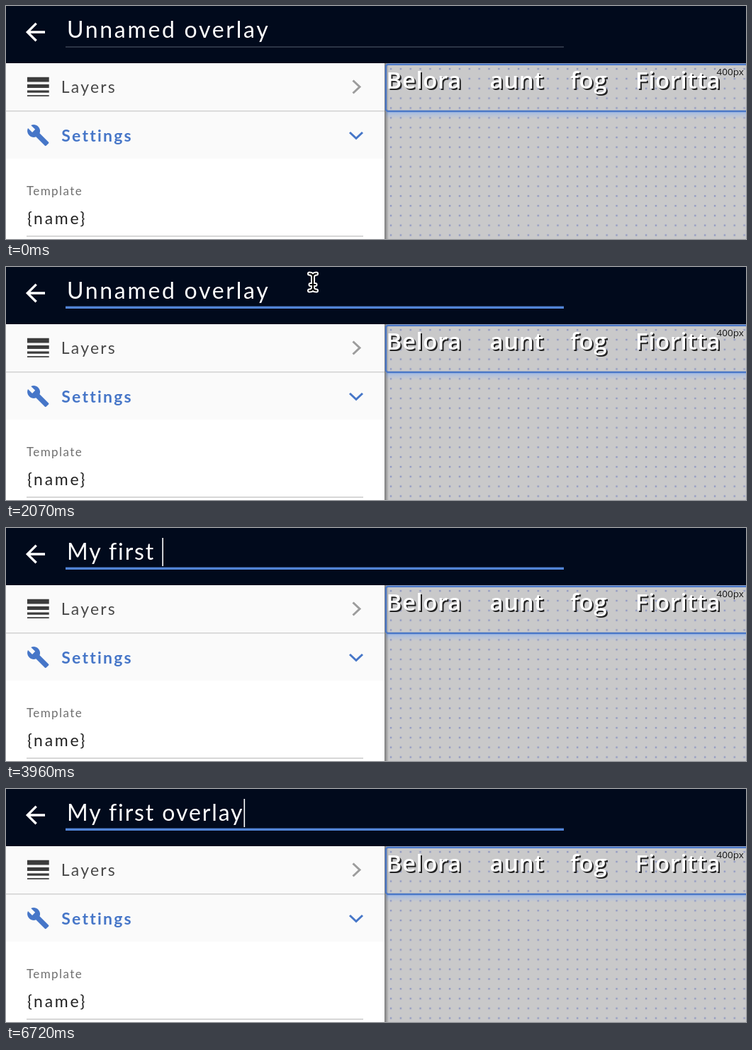
An HTML page that plays this animation: 1044x330 px, repeating every 6.75 s.

```html
<!DOCTYPE html>
<html lang="en">
<head>
<meta charset="utf-8">
<title>Rename an overlay</title>
<style>
  html, body { margin: 0; width: 100%; height: 100%; overflow: hidden; background: #010a1c; }
  svg { display: block; width: 1044px; height: 330px; }
  text { font-family: Lato, "Open Sans", sans-serif; white-space: pre; }
  #title { font-size: 32px; fill: #fff; }
  .item { font-size: 23px; letter-spacing: 2.2px; }
  .label { font-size: 17px; letter-spacing: 1.4px; fill: #707070; }
  .names { filter: drop-shadow(2px 2px .5px #222); }
  .names text { font: 600 33px "Open Sans", sans-serif; letter-spacing: .6px; fill: #fff; }
  .size { font: 13.5px "Open Sans", sans-serif; fill: #151515; }
</style>
</head>
<body>
<svg viewBox="0 0 1044 330" xmlns="http://www.w3.org/2000/svg">
  <defs>
    <pattern id="dots" x="536" y="82.1" width="13.85" height="13.85" patternUnits="userSpaceOnUse">
      <rect x="5.8" y="5.8" width="2.4" height="2.4" fill="#8f98c2"/>
    </pattern>
    <linearGradient id="edge">
      <stop offset="0" stop-color="#000" stop-opacity=".4"/>
      <stop offset="1" stop-color="#000" stop-opacity="0"/>
    </linearGradient>
    <linearGradient id="glow" x2="0" y2="1">
      <stop offset="0" stop-color="#8fb2ee" stop-opacity=".7"/>
      <stop offset="1" stop-color="#a9c2ee" stop-opacity="0"/>
    </linearGradient>
    <path id="beam" d="M-5-11.5Q0-11.5 0-7V8Q0 12.5-5 12.5M5-11.5Q0-11.5 0-7M0 8Q0 12.5 5 12.5M-3.5 4H3.5"/>
  </defs>

  <!-- canvas -->
  <rect x="534" y="80" width="510" height="250" fill="#c9c9ca"/>
  <rect x="534" y="80" width="510" height="250" fill="url(#dots)"/>
  <rect x="536" y="150" width="508" height="10" fill="url(#glow)"/>
  <rect x="534" y="80" width="6" height="250" fill="url(#edge)"/>
  <rect x="536" y="82.8" width="520" height="66.2" rx="3" fill="none" stroke="#4a77c6" stroke-width="2.4"/>
  <g class="names">
    <text x="536.5" y="117">Belora</text>
    <text x="682.5" y="117">aunt</text>
    <text x="796" y="117">fog</text>
    <text x="888" y="117">Fioritta</text>
  </g>
  <text class="size" x="1002.5" y="98">400px</text>

  <!-- side panel -->
  <rect y="80" width="534" height="250" fill="#fff"/>
  <rect y="80" width="534" height="136" fill="#fafafa"/>
  <rect y="148" width="534" height="1.5" fill="#d2d2d2"/>
  <path transform="translate(24.8 93.8) scale(1.71)" fill="#3c3c3c"
    d="M3 4h18v4H3zM3 10h18v3H3zM3 15h18v2H3zM3 19h18v1H3z"/>
  <text class="item" x="77.8" y="123" fill="#484848">Layers</text>
  <path d="M489.5 105.5l9.5 9-9.5 9" fill="none" stroke="#9c9c9c" stroke-width="3"/>
  <path transform="translate(28.8 166.6) scale(1.375)" fill="#4676c8"
    d="M22.7 19l-9.1-9.1c.9-2.3.4-5-1.5-6.9-2-2-5-2.4-7.4-1.3L9 6 6 9 1.6 4.7C.4 7.1.9 10.1 2.9 12.1c1.9 1.9 4.6 2.4 6.9 1.5l9.1 9.1c.4.4 1 .4 1.4 0l2.3-2.3c.5-.4.5-1.1.1-1.4z"/>
  <text class="item" x="78.3" y="191.5" font-weight="700" fill="#4676c8">Settings</text>
  <path d="M485 179l9 8.5 9-8.5" fill="none" stroke="#4676c8" stroke-width="3"/>
  <text class="label" x="29" y="268">Template</text>
  <text class="item" x="30" y="309" fill="#222" style="letter-spacing: 2.7px">{name}</text>
  <rect x="29" y="325.4" width="475" height="1.3" fill="#c2c2c2"/>

  <!-- header -->
  <rect width="1044" height="81" fill="#010a1c"/>
  <path transform="translate(21.2 16.7) scale(1.69)" fill="#fff"
    d="M20 11H7.83l5.59-5.59L12 4l-8 8 8 8 1.41-1.41L7.83 13H20z"/>
  <text id="title" x="86" y="44.5" xml:space="preserve"></text>
  <rect x="84" y="57.5" width="703" height="1" fill="#596170"/>
  <rect id="hover" x="84" y="57" width="703" height="2" fill="#4a7ac9"/>
  <rect id="focus" y="55.6" height="3.2" fill="#5284d6"/>
  <rect id="caret" y="14" width="1.6" height="40" fill="#fff"/>
  <g id="pointer" fill="none" stroke-linecap="round">
    <use href="#beam" stroke="#fff" stroke-width="6"/>
    <use href="#beam" stroke="#080808" stroke-width="2.2"/>
  </g>
</svg>
<script>
const LOOP = 6750, BLINK = 500;
const MOVE = 720, CLICK = 1450, CLEAR = 2400;
const OLD = 'Unnamed overlay';

// each word: text, first key time, time between keys
const words = [['My ', 2640, 155], ['first ', 3330, 114], ['overlay', 4020, 85]];
const keys = words.flatMap(([word, start, step]) =>
  [...word].map((char, i) => ({ char, at: start + i * step })));

const [title, hover, focus, caret, pointer] =
  ['title', 'hover', 'focus', 'caret', 'pointer'].map(id => document.getElementById(id));

const clamp = v => Math.min(1, Math.max(0, v));
const ease = v => v * v * (3 - 2 * v);
const progress = (t, start, length) => ease(clamp((t - start) / length));
const show = (node, on) => node.setAttribute('visibility', on ? 'visible' : 'hidden');

function draw(t) {
  const typed = keys.filter(key => key.at <= t);
  const cleared = t >= CLEAR;
  const text = cleared ? typed.map(key => key.char).join('') : OLD;
  title.style.letterSpacing = cleared ? '1.9px' : '2.7px';
  if (title.textContent !== text) title.textContent = text;

  // the caret restarts its blink after every edit
  const last = typed.length ? typed[typed.length - 1].at : cleared ? CLEAR : CLICK;
  show(caret, t >= CLICK && Math.floor((t - last) / BLINK) % 2 === 0);
  caret.setAttribute('x', 86 + (text ? title.getComputedTextLength() : 0));

  hover.setAttribute('opacity', progress(t, MOVE, 200));
  const width = 703 * progress(t, CLICK, 200);
  focus.setAttribute('x', 435.5 - width / 2);
  focus.setAttribute('width', width);

  const p = progress(t, MOVE, 380);
  show(pointer, t >= MOVE && !cleared);
  pointer.setAttribute('transform', `translate(${578 - 145 * p} ${37 - 16 * p})`);
}

function frame() {
  draw(performance.now() % LOOP);
  requestAnimationFrame(frame);
}
frame();
</script>
</body>
</html>
```
